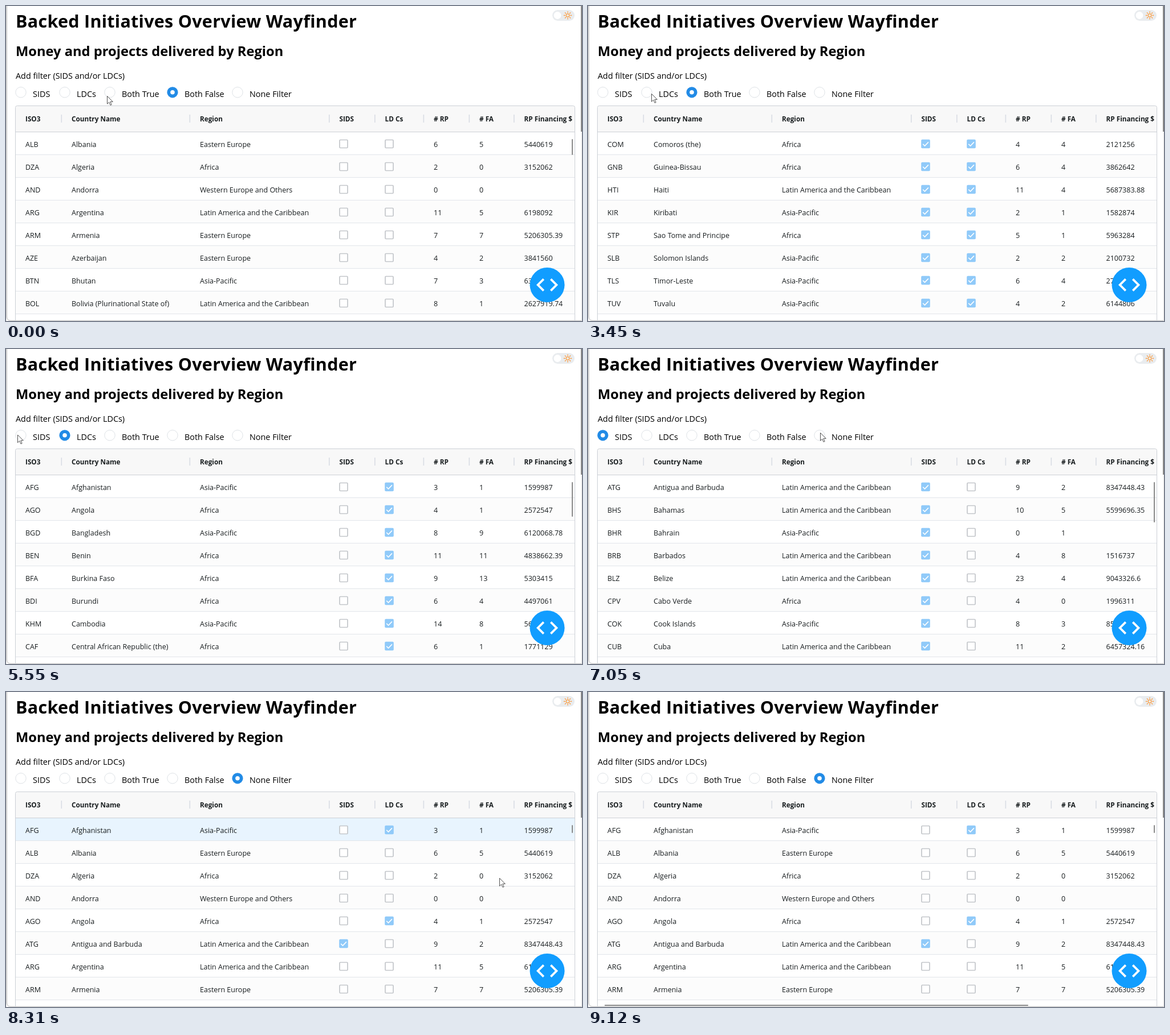
Write an HTML page that moves like this. It is 1010 px wide and 554 px high and loops after 9.85 s.

```html
<!DOCTYPE html>
<html lang="en">
<head>
<meta charset="utf-8">
<title>Backed Initiatives Overview Wayfinder</title>
<style>
  html, body { margin: 0; width: 100%; height: 100%; overflow: hidden; background: #fff; }
  svg { display: block; width: 1010px; height: 554px; font-family: "Open Sans", "Noto Sans", sans-serif; }
  text { white-space: pre; }
  .title { font-size: 30.5px; font-weight: 700; letter-spacing: .27px; }
  .subtitle { font-size: 23.7px; font-weight: 700; }
  .label { font-size: 14.4px; }
  .head { font-size: 11.75px; font-weight: 700; fill: #181d1f; }
  .cell { font-size: 12.53px; fill: #181d1f; }
  .thumb { fill: #8a8a8a; }
</style>
</head>
<body>
<svg viewBox="0 0 1010 554">
  <defs><clipPath id="clip"><rect x="17" y="176" width="980" height="378"/></clipPath></defs>
  <g id="page"></g>
  <g id="grid" clip-path="url(#clip)"></g>
  <path d="M16.5 554V178.5Q16.5 175.5 19.5 175.5H994.5Q997.5 175.5 997.5 178.5V554" fill="none" stroke="#ccd0d6"/>
  <g id="radios"></g>
  <rect id="vbar" class="thumb" x="992" y="234" width="2" rx="1"/>
  <rect id="hbar" class="thumb" x="29" y="550" width="743" height="2" rx="1"/>
  <circle cx="949" cy="490.5" r="30.5" fill="#119dff"/>
  <path transform="translate(949 490.5) scale(1.9)" d="M-3.3-5.3-8.6 0l5.3 5.3M3.3-5.3 8.6 0 3.3 5.3" fill="none" stroke="#fff" stroke-width="2"/>
  <g id="cursor">
    <circle id="click" r="11.5" fill="#ff0" fill-opacity=".47"/>
    <path id="arrow" d="M.5.5V14.2L3.7 11.2 6 16.4 8.1 15.5 5.9 10.4H10.3Z" fill="#fff" stroke="#333" stroke-width=".85"/>
    <path id="hand" d="M-1.5 11V.8Q-1.5-1 0-1T1.5.8V6Q3-.2 4 6.4 5.7 4.6 6.5 7 8.8 5.8 9 8.6V13Q8.4 16 7 17.5V19H-1V17.5L-6 11.5Q-7 9-4.6 9.2Z" fill="#fff" stroke="#222"/>
  </g>
</svg>
<script>
const LOOP = 9850, FRAME = 67;
const HELD = 205, LOADED = 330;   // ms from press to release, and to new rows
const GONE = 8980;                // pointer leaves the window
const ROW = 40, ROWS = 8, TOP = 222;
const $ = id => document.getElementById(id);

const HEADERS = ["ISO3", "Country Name", "Region", "SIDS", "LD Cs", "# RP", "# FA", "RP Financing $"];
const DIVIDERS = [16, 97, 322, 566.5, 646.5, 732, 812, 890.5];
const REGIONS = {
  E: "Eastern Europe", F: "Africa", P: "Asia-Pacific",
  W: "Western Europe and Others", L: "Latin America and the Caribbean"
};

// code, country, region, flags (s = SIDS, l = LDC), RP, FA, financing
const COUNTRIES = `
AFG|Afghanistan|P|l|3|1|1599987
ALB|Albania|E||6|5|5440619
DZA|Algeria|F||2|0|3152062
AND|Andorra|W||0|0|
AGO|Angola|F|l|4|1|2572547
ATG|Antigua and Barbuda|L|s|9|2|8347448.43
ARG|Argentina|L||11|5|6198092
ARM|Armenia|E||7|7|5206305.39
AZE|Azerbaijan|E||4|2|3841560
BHS|Bahamas|L|s|10|5|5599696.35
BHR|Bahrain|P|s|0|1|
BGD|Bangladesh|P|l|8|9|6120068.78
BRB|Barbados|L|s|4|8|1516737
BLZ|Belize|L|s|23|4|9043326.6
BEN|Benin|F|l|11|11|4838662.39
BTN|Bhutan|P||7|3|63
BOL|Bolivia (Plurinational State of)|L||8|1|2627919.74
BFA|Burkina Faso|F|l|9|13|5303415
BDI|Burundi|F|l|6|4|4497061
CPV|Cabo Verde|F|s|4|0|1996311
KHM|Cambodia|P|l|14|8|56
CAF|Central African Republic (the)|F|l|6|1|1771129
COM|Comoros (the)|F|sl|4|4|2121256
COK|Cook Islands|P|s|8|3|85
CUB|Cuba|L|s|11|2|6457324.16
GNB|Guinea-Bissau|F|sl|6|4|3862642
HTI|Haiti|L|sl|11|4|5687383.88
KIR|Kiribati|P|sl|2|1|1582874
STP|Sao Tome and Principe|F|sl|5|1|5963284
SLB|Solomon Islands|P|sl|2|2|2100732
TLS|Timor-Leste|P|sl|6|4|27
TUV|Tuvalu|P|sl|4|2|6144806`.trim().split("\n").map(line => line.split("|"));

const FILTERS = [
  { name: "SIDS", x: 26, bar: 71, flags: "s" },
  { name: "LDCs", x: 103, bar: 61, flags: "l" },
  { name: "Both True", x: 182, bar: 0, flags: "sl" },
  { name: "Both False", x: 292, bar: 28, flags: "" },
  { name: "None Filter", x: 406, bar: 14 }
];

// press time, filter picked (one press misses)
const FIRST = 3;
const CLICKS = [[270, 2], [2380, 2], [3660, 1], [5680, 0], [7380, 4]];

// first step, last step, points passed on the way
const START = [177, 158];
const MOVES = [
  [70, 70, [181, 157]],
  [1190, 1520, [116, 156]],
  [1980, 2110, [112, 155]],
  [3450, 3520, [110, 153]],
  [4470, 5420, [70, 131], [18, 148]],
  [5550, 5620, [22, 153]],
  [6300, 6580, [255, 137], [488, 155]],
  [6780, 7050, [407, 147]],
  [7800, 8310, [720, 165], [865, 327]],
  [8380, 8570, [905, 470], [922, 490]],
  [8640, GONE, [935, 554]]
];

const text = (cls, x, y, str) => `<text class="${cls}" x="${x}" y="${y}">${str}</text>`;
const rect = (x, y, w, h, fill, extra = "") =>
  `<rect x="${x}" y="${y}" width="${w}" height="${h}" fill="${fill}" ${extra}/>`;
const circle = (x, y, r, fill, extra = "") =>
  `<circle cx="${x}" cy="${y}" r="${r}" fill="${fill}" ${extra}/>`;

function checkbox(x, y, on) {
  return on
    ? rect(x - 7.8, y - 7.8, 15.6, 15.6, "#90caf9", 'rx="2"') +
      `<path d="M${x - 4.8} ${y + .2}l3.3 3.3 6.4-6.6" fill="none" stroke="#fff" stroke-width="1.6"/>`
    : rect(x - 7, y - 7, 14, 14, "#fff", 'rx="1.2" stroke="#c3c6ca" stroke-width="1.7"');
}

function sun(x, y) {
  let rays = "";
  for (let a = 0; a < 360; a += 45)
    rays += `<path d="M5 0h1.6" transform="rotate(${a})"/>`;
  return `<g transform="translate(${x} ${y})" fill="none" stroke="#fd9a3c" stroke-width="1.3"
    stroke-linecap="round"><circle r="2.9"/>${rays}</g>`;
}

function drawPage() {
  $("page").innerHTML =
    '<path d="M1.5 0V546Q1.5 553.3 8 553.3H1010" fill="none" stroke="#b9b9b9"/>' +
    rect(0, 0, 1, 554, "#e4e4e4") +
    rect(1009, 0, 1, 554, "#e3e3e3") +
    rect(1008, 0, 2, 221, "#858585") +
    text("title", 17, 37.5, document.title) +
    text("subtitle", 17, 87.5, "Money and projects delivered by Region") +
    text("label", 17, 127.5, "Add filter (SIDS and/or LDCs)") +
    FILTERS.map(f => text("label", f.x + 21, 159.5, f.name)).join("") +
    rect(958, 7, 39, 19, "#e9ecef", 'rx="9.5"') +
    circle(967, 16.5, 6.5, "#fff") + sun(985, 16.5);
}

function drawRow([iso, country, region, flags, rp, fa, money], i, hover) {
  const y = TOP + i * ROW;
  const fill = i === hover ? "#e8f4fe" : i % 2 ? "#fcfcfc" : "#fff";
  const cells = [iso, country, REGIONS[region], "", "", rp, fa, money];
  return rect(17, y, 980, ROW - 1, fill) + rect(17, y + ROW - 1, 980, 1, "#e2e5ea") +
    cells.map((c, k) => text("cell", DIVIDERS[k] + 18, y + 26, c)).join("") +
    checkbox(592, y + 20.5, flags.includes("s")) +
    checkbox(672, y + 20.5, flags.includes("l"));
}

function drawGrid({ flags }, hover) {
  const rows = COUNTRIES.filter(c => flags === undefined || c[3] === flags).slice(0, ROWS);
  $("grid").innerHTML =
    rect(17, 176, 980, 45, "#f8f8f8") + rect(17, 221, 980, 1, "#ccd0d6") +
    HEADERS.map((h, k) => text("head", DIVIDERS[k] + 18, 203, h)).join("") +
    DIVIDERS.slice(1).map(x => rect(x - .5, 191, 1.6, 14, "#d9dde4")).join("") +
    rows.map((row, i) => drawRow(row, i, hover)).join("");
}

function drawRadios(picked) {
  $("radios").innerHTML = FILTERS.map(({ x }, i) => i === picked
    ? circle(x, 151.8, 9.6, "#228be6") + circle(x, 151.8, 3.8, "#fff")
    : circle(x, 151.8, 9.2, "#fff", 'stroke="#dee2e6"')).join("");
}

function along(points, f) {
  const p = f * (points.length - 1);
  const i = Math.min(Math.floor(p), points.length - 2);
  return points[i].map((v, k) => v + (points[i + 1][k] - v) * (p - i));
}

// The pointer advances once per recorded frame.
function cursorAt(t) {
  let pos = START;
  for (const [from, to, ...path] of MOVES) {
    if (t < from) break;
    const steps = Math.round((to - from) / FRAME) + 1;
    const done = t >= to ? steps : Math.floor((t - from) / (to - from) * (steps - 1)) + 1;
    pos = along([pos, ...path], done / steps);
  }
  return pos;
}

// The row highlight trails the pointer by one frame.
function hoverAt(t) {
  const row = Math.floor((cursorAt(t - FRAME)[1] - TOP) / ROW);
  return t < GONE && row >= 0 ? Math.min(row, ROWS - 1) : -1;
}

const pickAt = t => CLICKS.reduce((pick, [at, next]) => t >= at ? next : pick, FIRST);
const show = (id, on) => $(id).setAttribute("visibility", on ? "visible" : "hidden");

let drawn = "";
function render(t) {
  const radio = pickAt(t - HELD), view = pickAt(t - LOADED), hover = hoverAt(t);
  const state = [radio, view, hover].join();
  if (state !== drawn) {
    drawRadios(radio);
    drawGrid(FILTERS[view], hover);
    $("vbar").setAttribute("height", FILTERS[view].bar);
    drawn = state;
  }
  show("hbar", t >= 9120);

  const [x, y] = cursorAt(t);
  const over = Math.hypot(x - 949, y - 490.5) < 30.5;
  $("cursor").setAttribute("transform", `translate(${x} ${y})`);
  show("arrow", t < GONE && !over);
  show("hand", t < GONE && over);
  show("click", CLICKS.some(([at]) => t >= at && t < at + HELD));
}

drawPage();
function tick() {
  render(performance.now() % LOOP);
  requestAnimationFrame(tick);
}
tick();
</script>
</body>
</html>
```
